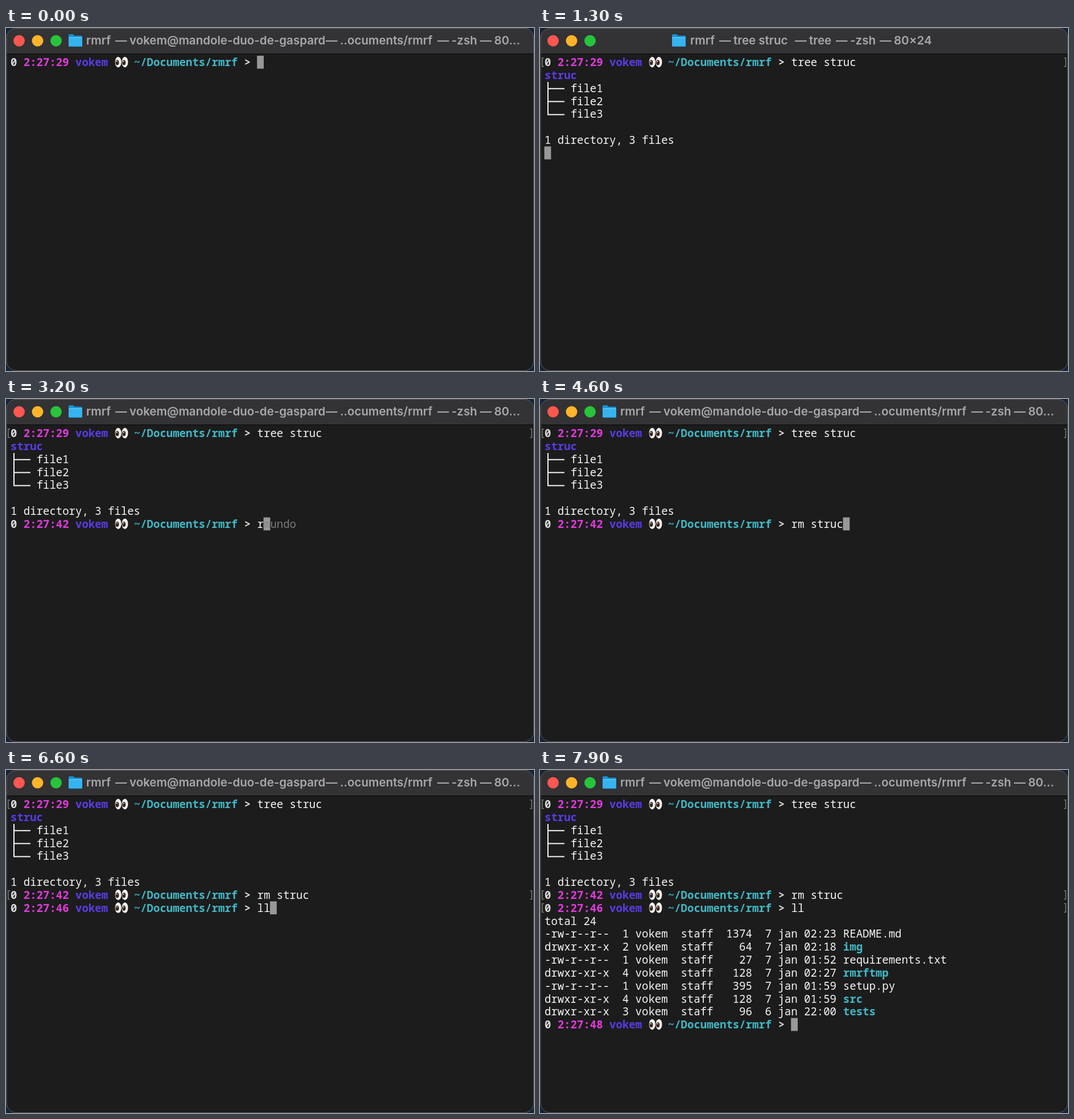
An HTML page that plays this animation: 928 by 604 pixels, repeating every 8 s.

```html
<!DOCTYPE html>
<html>
<head>
<meta charset="utf-8">
<style>
  html, body { margin: 0; width: 100%; height: 100%; overflow: hidden; background: #14243a; }
  svg { display: block; width: 928px; height: 604px; }
  text { white-space: pre; }
  .mono { font: 500 19px "Noto Sans Mono", "DejaVu Sans Mono", monospace; fill: #f6f6f6; }
  .bold { font-weight: 700; }
  .title { font: 600 20.5px Inter, "Open Sans", sans-serif; fill: #a9a7aa; }
</style>
</head>
<body>
<svg viewBox="0 0 928 604">
  <rect x="1" y=".5" width="926.5" height="603" rx="17" fill="#1c1c1c"/>
  <path d="M1 45V17.5a17 17 0 0 1 17-17H910.5a17 17 0 0 1 17 17V45z" fill="#333234"/>
  <path d="M1 45.5H927" stroke="#070707"/>
  <rect x="1" y=".5" width="926.5" height="603" rx="17" fill="none" stroke="#626264"/>
  <circle cx="23" cy="22.5" r="10" fill="#fe5650"/>
  <circle cx="55.5" cy="22.5" r="10" fill="#ffb429"/>
  <circle cx="88" cy="22.5" r="10" fill="#27c43c"/>
  <g id="screen"></g>
</svg>
<script>
const LOOP = 8000, STEP = 100;
const CELL = 11.41, ROW = 22.82, LEFT = 8, TOP = 48.8;
const USER = 'vokem', HOST = 'mandole-duo-de-gaspard';
const MAGENTA = '#e33ade', BLUE = '#5b3be6', TEAL = '#40b8c5', GREY = '#7b7b7b';
const screen = document.getElementById('screen');

const colX = col => LEFT + col * CELL;
const rowY = row => TOP + row * ROW;
const esc = s => s.replace(/>/g, '&gt;');

const put = (row, col, s, color = '#f6f6f6', bold = false) =>
  `<text class="mono${bold ? ' bold' : ''}" x="${colX(col)}" y="${rowY(row) + 18.4}" fill="${color}" style="fill:${color}">${esc(s)}</text>`;

const cursor = (row, col) =>
  `<rect x="${colX(col) - .4}" y="${rowY(row)}" width="11.8" height="22.8" fill="#989898"/>`;

const eye = (x, y) =>
  `<ellipse cx="${x}" cy="${y}" rx="5.5" ry="9.3" fill="#f3f1ee"/>
   <ellipse cx="${x - 1.7}" cy="${y + .8}" rx="3" ry="4.6" fill="#38231a"/>
   <circle cx="${x - 2.3}" cy="${y - 1.2}" r="1" fill="#fff"/>`;

function prompt(row, time) {
  const y = rowY(row) + 11.2;
  return put(row, 0, '0', '#dcdcdc', true) + put(row, 2, time, MAGENTA, true) +
    put(row, 10, USER, BLUE, true) + eye(197.2, y) + eye(209, y) +
    put(row, 19, '~/Documents/rmrf', TEAL, true) + put(row, 36, '>', '#dcdcdc', true);
}

// Command being edited, with the greyed suggestion after the cursor.
function typing(row, typed, hint = '') {
  const col = 38 + typed.length;
  return put(row, 38, typed) + cursor(row, col) +
    put(row, col, hint.slice(0, 1), '#858585') + put(row, col + 1, hint.slice(1), GREY);
}

function entered(row, command) {
  const y = rowY(row) + 4;
  return put(row, 38, command) +
    `<path d="M7 ${y}H4V${y + 15}H7M921 ${y}H924V${y + 15}H921" fill="none" stroke="#8b8b8b" stroke-width="1.3"/>`;
}

function tree() {
  const lines = [2, 3, 4].map(r => `M14 ${rowY(r) + 12.3}H43`).join('');
  return put(1, 0, 'struc', BLUE, true) +
    `<path d="M14 95V${rowY(4) + 13.3}${lines}" fill="none" stroke="#f6f6f6" stroke-width="2"/>` +
    [1, 2, 3].map(n => put(n + 1, 4, 'file' + n)).join('') +
    put(6, 0, '1 directory, 3 files');
}

const files = [
  [1, 1374, '7 jan 02:23', 'README.md'],
  [2, 64, '7 jan 02:18', 'img'],
  [1, 27, '7 jan 01:52', 'requirements.txt'],
  [4, 128, '7 jan 02:27', 'rmrftmp'],
  [1, 395, '7 jan 01:59', 'setup.py'],
  [4, 128, '7 jan 01:59', 'src'],
  [3, 96, '6 jan 22:00', 'tests']
];

const listing = () => put(9, 0, 'total 24') + files.map(([links, size, date, name], i) => {
  const dir = links > 1;
  const mode = dir ? 'drwxr-xr-x' : '-rw-r--r--';
  return put(10 + i, 0, `${mode}  ${links} ${USER}  staff  ${String(size).padStart(4)}  ${date}`) +
    put(10 + i, 46, name, dir ? TEAL : '#f6f6f6', dir);
}).join('');

const folder = (x, dim) =>
  `<g transform="translate(${x} 10)" opacity="${dim ? .5 : 1}">
    <path d="M0 3Q0 1 2 1H8L10.500 3.500H22Q24 3.500 24 5.500V12H0z" fill="#1792d3"/>
    <rect y="6" width="24" height="17" rx="1.800" fill="#36b4f1"/>
    <path d="M.5 6.600H23.500" stroke="#73d0fa"/>
    <path d="M1 22.300H23" stroke="#1c8fce"/>
  </g>`;

const words = list => list.map(([x, s]) => `<text class="title" x="${x}" y="29.300">${s}</text>`).join('');

function title(t) {
  if (t >= 1300 && t < 1500)
    return folder(232, false) + words([[264, 'rmrf'], [315, '—'], [340, 'tree struc'], [448, '—'],
      [473, 'tree'], [520, '—'], [545, '-zsh'], [597, '—'], [622, '80×24']]);
  const busy = t >= 5500 && t < 5800;
  return folder(110, busy) +
    words([[141, 'rmrf'], [192, '—'], [217, `${USER}@${HOST}`], [562, '—'], [587, '..ocuments/rmrf'], [758, '—']]) +
    (busy ? words([[783, 'rmrf struc…']]) + '<circle cx="23" cy="22.5" r="3" fill="#8c1a14"/>'
          : words([[783, '-zsh'], [833, '—'], [858, '80…']]));
}

function draw(t) {
  let out = title(t) + prompt(0, '2:27:29');

  if (t < 400) out += typing(0, '');
  else if (t < 600) out += typing(0, 't', 'ree struc');
  else if (t < 800) out += typing(0, 'tr', 'ee struc');
  else if (t < 1300) out += typing(0, 'tree struc');
  else out += entered(0, 'tree struc') + tree();

  if (t >= 1300 && t < 1400) out += cursor(7, 0);
  if (t >= 1400) {
    out += prompt(7, '2:27:42');
    if (t < 3100) out += typing(7, '');
    else if (t < 3700) out += typing(7, 'r', 'mundo');
    else if (t < 4400) out += typing(7, 'rm', ' struc');
    else if (t < 5500) out += typing(7, 'rm struc');
    else out += entered(7, 'rm struc');
  }

  if (t >= 5500 && t < 5800) out += cursor(8, 0);
  if (t >= 5800) {
    out += prompt(8, '2:27:46');
    if (t < 6300) out += typing(8, '');
    else if (t < 6500) out += typing(8, 'l', 'l');
    else if (t < 7000) out += typing(8, 'll');
    else out += entered(8, 'll') + listing();
  }

  if (t >= 7000 && t < 7200) out += cursor(17, 0);
  if (t >= 7200) out += prompt(17, '2:27:48') + typing(17, '');
  screen.innerHTML = out;
}

const start = performance.now();
let last = -1;
function tick() {
  const step = Math.floor((performance.now() - start) % LOOP / STEP);
  if (step !== last) draw((last = step) * STEP);
  requestAnimationFrame(tick);
}
tick();
</script>
</body>
</html>
```
